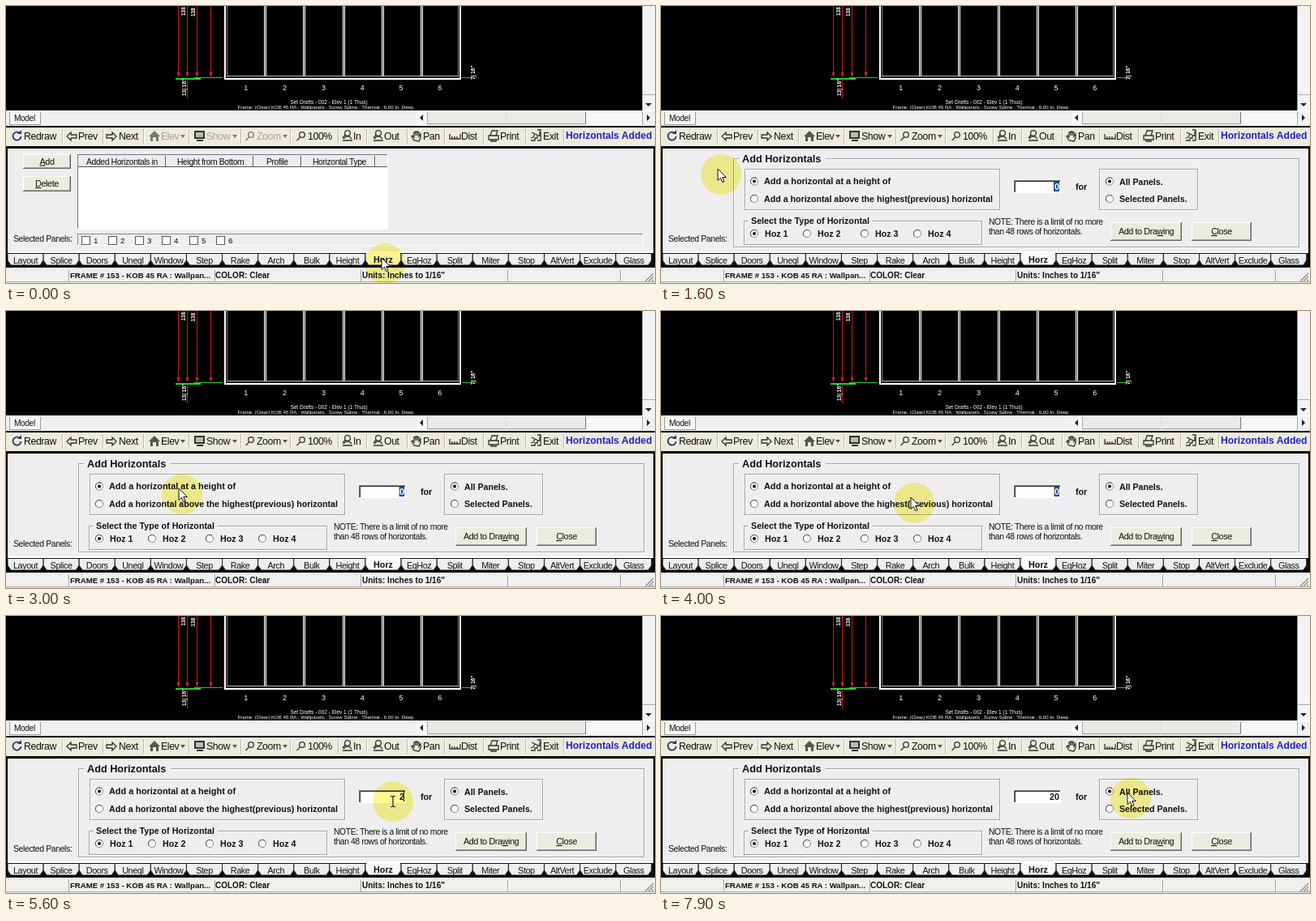
An HTML page that plays this animation: 800 by 342 pixels, repeating every 8 s.

```html
<!DOCTYPE html>
<html lang="en">
<head>
<meta charset="utf-8">
<title>Add Horizontals</title>
<style>
html, body { margin: 0; width: 100%; height: 100%; overflow: hidden; background: #000; }
svg { display: block; width: 800px; height: 342px; font-family: "Liberation Sans", Arial, sans-serif; }
text { white-space: pre; fill: #111; }
rect { shape-rendering: crispEdges; }
.b { font-weight: bold; }
.tight { letter-spacing: -.4px; }
.mid { text-anchor: middle; }
.end { text-anchor: end; }
.u { text-decoration: underline; }
.cad text { fill: #fff; }
.tool { fill: none; stroke: #333; stroke-width: 1.3; }
.off text { fill: #a3a399; }
.off .tool { stroke: #777; }
.off .solid { fill: #777; }
#halo { mix-blend-mode: multiply; }
#caret { mix-blend-mode: difference; }
</style>
</head>
<body>
<svg id="stage" viewBox="0 0 800 342"></svg>
<script>
const FACE = '#efeeee';
const rect = (x, y, w, h, fill, more = '') =>
  `<rect x="${x}" y="${y}" width="${w}" height="${h}" fill="${fill}" ${more}/>`;
const text = (x, y, s, size, cls = '', more = '') =>
  `<text x="${x}" y="${y}" font-size="${size}" class="${cls}" ${more}>${s}</text>`;
const path = (d, stroke, w = 1, fill = 'none', more = '') =>
  `<path d="${d}" stroke="${stroke}" stroke-width="${w}" fill="${fill}" ${more}/>`;
const each = (list, fn) => list.map(fn).join('');
const key = c => `<tspan class="u">${c}</tspan>`;

const button = (x, y, w, h, label) =>
  rect(x, y, w, h, '#666') + rect(x, y, w - 1, h - 1, '#fff') +
  rect(x + 1, y + 1, w - 2, h - 2, '#a5a5a0') + rect(x + 1, y + 1, w - 3, h - 3, '#ecebe0') +
  text(x + w / 2, y + h / 2 + 3.5, label, 10.8, 'mid tight');

const sunken = (x, y, w, h) =>
  rect(x, y, w, h, '#fff') + rect(x, y, w - 1, h - 1, '#777') +
  rect(x + 1, y + 1, w - 2, h - 2, '#333') + rect(x + 2, y + 2, w - 3, h - 3, '#fff');

const group = (x, y, w, h) =>
  rect(x + 1.5, y + 1.5, w, h, 'none', 'stroke="#fff"') +
  rect(x + .5, y + .5, w, h, 'none', 'stroke="#a2a2a2"');

const radio = (x, y, on) =>
  `<circle cx="${x}" cy="${y}" r="4.6" fill="#fff" stroke="#8a8a8a"/>` +
  path(`M${x - 3.3} ${y + 3.3}A4.6 4.6 0 0 1 ${x + 3.3} ${y - 3.3}`, '#555') +
  (on ? `<circle cx="${x}" cy="${y}" r="2" fill="#000"/>` : '');

function drawing() {
  const mullions = each([0, 1, 2, 3, 4], i => {
    const x = 318 + Math.round(i * 48.3);
    return rect(x, 0, 1, 87, '#fff') + rect(x + 1, 0, 1, 87, '#444') + rect(x + 2, 0, 1, 87, '#fff');
  });
  const dims = each([212, 223, 235, 252], x =>
    rect(x, 0, 1, 87, '#d01818') + path(`M${x - 1.5} 82h4l-2 6z`, 'none', 0, '#e02020'));
  const turned = (x, y, s) => text(x, y, s, 6.5, 'b', `transform="rotate(-90 ${x} ${y})"`);
  return `<g class="cad">` + rect(0, 0, 800, 130, '#000') + mullions +
    rect(269, 0, 2, 91, '#fff') + rect(272, 0, 1, 86, '#888') +
    rect(557, 0, 1, 86, '#888') + rect(559, 0, 2, 91, '#fff') +
    rect(272, 86, 286, 1, '#bbb') + rect(269, 89, 292, 2, '#fff') +
    dims + rect(223, 92, 1, 22, '#d01818') + rect(577, 88, 4, 1, '#b02020') +
    rect(209, 89, 31, 2, '#20d030') + rect(232, 88, 35, 1, '#20d030') + rect(562, 88, 16, 1, '#20c030') +
    turned(221, 12, '138') + turned(233, 13, '138 3') + turned(222, 111, '13| 16"') + turned(578, 91, '7| 16"') +
    each([1, 2, 3, 4, 5, 6], n => text(248 + n * 47.8, 104, n, 9, 'mid')) +
    text(398, 121, 'Set Drafts - 002 - Elev 1 (1 Thus)', 6.5, 'mid') +
    text(394, 126.5, 'Frame: (Clear) KOB 45 RA : Wallpanels : Screw Spline : Thermal : 6.00 In. Deep', 6.1, 'mid') +
    `</g>`;
}

function scrollbars() {
  const arrow = d => path(d, 'none', 0, '#222');
  return rect(784, 0, 16, 129, '#f3f3f3') + rect(784, 0, 1, 129, '#999') +
    rect(785, 109, 15, 1, '#aaa') + arrow('M788 120h8l-4 4z') +
    rect(0, 129, 800, 19, '#f0f0f0') + rect(0, 129, 800, 1, '#fff') +
    rect(4, 131, 39, 16, '#999') + rect(5, 130, 37, 16, '#f6f6f4') +
    text(10, 142, 'Model', 10.2, 'tight') +
    rect(506, 131, 278, 15, '#f7f7f7') + rect(519, 131, 1, 15, '#aaa') +
    rect(520, 131, 195, 15, '#eceae6') + rect(520, 145, 195, 1, '#999') + rect(714, 131, 1, 15, '#777') +
    rect(616, 131, 1, 15, '#ddd') + arrow('M514 134v8l-4-4z') + arrow('M790 134v8l4-4z') +
    rect(784, 130, 1, 17, '#aaa');
}

function toolbar() {
  const label = (x, s) => text(x, 165, s, 12.3, 'tight');
  const lens = (x, y) => `<circle class="tool" cx="${x + 1}" cy="${y - 2}" r="3.3"/>` +
    `<path class="tool" d="M${x - 1.5} ${y + 1}l-4 4"/>`;
  const tool = d => `<path class="tool" d="${d}"/>`;
  const person = x => tool(`M${x - 6} 166h12M${x - 5} 164l3-3h4l3 3`) +
    `<circle class="tool" cx="${x}" cy="157" r="3.4"/>` + tool(`M${x - 3} 159l-3 4`);
  const drop = x => `<path class="solid" fill="#555" d="M${x} 159h6l-3 4z"/>`;
  const menus =
    `<g id="menus">` +
    `<path class="solid" fill="#555" d="M176 161l7-7 7 7h-2v6h-3v-5h-4v5h-3v-6z"/>` + label(191, 'Elev') + drop(215) +
    `<path fill="#333" d="M232 154h13v10h-13zM235 165h8v2h-8z"/>` +
    rect(234, 156, 9, 6, '#b9bcb4') + label(247, 'Show') + drop(279) +
    lens(301, 161) + label(309, 'Zoom') + drop(341) + `</g>`;
  const labels = [[22, 'Redraw'], [89, 'Prev'], [139, 'Next'], [372, '100%'], [428, 'In'], [466, 'Out'],
    [514, 'Pan'], [561, 'Dist'], [609, 'Print'], [662, 'Exit']];
  return rect(0, 148, 800, 2, '#000') + rect(0, 150, 800, 24, '#ecebdd') +
    each([69, 119, 169, 225, 289, 350, 409, 444, 494, 540, 588, 640, 687], x =>
      rect(x, 152, 1, 18, '#b9b9a8') + rect(x + 1, 152, 1, 18, '#fff')) +
    each(labels, ([x, s]) => label(x, s)) + menus +
    path('M17 157a5 5 0 1 0 1.500 4', '#26357c', 1.8) + path('M14 158h5v-5z', 'none', 0, '#26357c') +
    tool('M75 161l5-5v3h7v4h-7v3z') + tool('M136 161l-5-5v3h-7v4h7v3z') +
    lens(364, 161) + person(421) + person(459) +
    tool('M503 166l-3-5 1-1 2 2v-6h2v4-5h2v5-4h2v5l2-3v5l-2 4z') +
    tool('M547 158v6h13v-6M550 161v3M553 161v3M556 161v3') +
    tool('M595 160h12v5h-12zM597 160l2-6h7l-2 6M598 165v2h7') +
    tool('M647 166h5v-3h3v-3h3v-5M648 156l4 2-2 4-3 1M652 158l3 1M655 153h4v13h-4') +
    text(690, 164, 'Horizontals Added to', 12.1, 'b', 'style="fill:#2222cc"') +
    rect(0, 173, 800, 3, '#000');
}

function tableView() {
  const heads = [[99, 'Added Horizontals in'], [211, 'Height from Bottom'], [321, 'Profile'], [378, 'Horizontal Type']];
  return `<g id="table">` + button(21, 183, 59, 18, key('A') + 'dd') + button(21, 210, 59, 19, key('D') + 'elete') +
    rect(88, 183, 383, 93, '#fff') + rect(88, 183, 382, 1, '#777') + rect(88, 183, 1, 92, '#777') +
    rect(89, 184, 381, 15, '#ececea') + rect(89, 198, 381, 1, '#555') +
    each([196, 304, 363, 454], x => rect(x, 185, 1, 13, '#555') + rect(x + 1, 185, 1, 13, '#fff')) +
    each(heads, ([x, s]) => text(x, 195.5, s, 10.4, 'tight')) +
    rect(88, 281, 698, 15, '#fff') + rect(88, 281, 697, 14, '#888') + rect(89, 282, 696, 13, FACE) +
    each([1, 2, 3, 4, 5, 6], n => {
      const x = 60 + Math.round(n * 33.1);
      return rect(x + .5, 284.5, 10, 10, '#fff', 'stroke="#555"') + text(x + 15, 293, n, 9.8);
    }) + `</g>`;
}

function dialogView() {
  return `<g id="dialog">` + group(89, 188, 697, 109) + rect(96, 184, 107, 10, FACE) +
    text(100, 192.5, 'Add Horizontals', 12.7, 'b') +
    group(103, 201, 314, 50) + group(540, 201, 121, 50) + group(102, 265, 293, 29) +
    rect(108, 262, 153, 8, FACE) + text(111, 268.5, 'Select the Type of Horizontal', 10.7, 'b') +
    radio(115, 216.5, true) + text(127, 220, 'Add a horizontal at a height of', 10.9, 'b') +
    radio(115, 238, false) + text(127, 241.5, 'Add a horizontal above the highest(previous) horizontal', 10.65, 'b') +
    radio(553, 216.5, true) + text(565, 220.5, 'All Panels.', 10.6, 'b') +
    radio(553, 238, false) + text(565, 242, 'Selected Panels.', 10.6, 'b') +
    each([115, 180, 251, 316], (x, i) => radio(x, 281, !i) + text(x + 13, 285, 'Hoz ' + (i + 1), 10.7, 'b')) +
    sunken(435, 215, 58, 16) + `<rect id="mark" x="484" y="217" width="7" height="12" fill="#27498f"/>` +
    text(491, 227, '', 10.8, 'b end', 'id="value"') + `<rect id="caret" y="217" width="1" height="12" fill="#fff"/>` +
    text(511, 226.5, 'for', 10.7, 'b') +
    text(404, 270, 'NOTE: There is a limit of no more', 10.35, 'tight') +
    text(404, 281.5, 'than 48 rows of horizontals.', 10.35, 'tight') +
    button(554, 267, 88, 23, 'Add to Dra' + key('w') + 'ing') + button(654, 267, 74, 23, key('C') + 'lose') + `</g>`;
}

function tabs() {
  const names = ['Layout', 'Splice', 'Doors', 'Uneql', 'Window', 'Step', 'Rake', 'Arch', 'Bulk', 'Height', 'Horz',
    'EqHoz', 'Split', 'Miter', 'Stop', 'AltVert', 'Exclude', 'Glass'];
  const active = 10;
  const tab = (s, i) => {
    const x = 2 + i * 44.1, on = i === active;
    return path(`M${x} 306v8l4 6h36l4-6v-8`, '#222', 1, on ? '#fafafa' : FACE) +
      (on ? rect(x + 1, 304, 42, 3, '#fafafa') : '') +
      text(x + 22, on ? 316.5 : 317.5, s, 10.8, on ? 'b mid' : 'mid tight');
  };
  return rect(0, 303, 800, 2, '#fff') + rect(0, 305, 800, 16, '#111') +
    each(names, tab) + rect(0, 320, 800, 3, '#000') + rect(0, 176, 2, 146, '#000') + rect(798, 176, 2, 146, '#000');
}

function statusBar() {
  return rect(0, 323, 800, 19, '#f0f0ef') + rect(0, 323, 800, 1, '#fff') +
    each([77, 257, 437, 618, 757], x => rect(x, 326, 1, 14, '#999') + rect(x + 1, 326, 1, 14, '#fff')) +
    rect(0, 340, 800, 1, '#aaa') +
    text(79, 336, 'FRAME # 153 - KOB 45 RA : Wallpan...', 9.6, 'b') +
    text(258, 336, 'COLOR: Clear', 10, 'b') + text(439, 336, 'Units: Inches to 1/16"', 10, 'b') +
    path('M788 340l10-10M792 340l6-6M796 340l2-2', '#888', 1.3);
}

const pointer =
  `<g id="pointer"><circle id="halo" r="25" fill="#fcf894"/>` +
  path('M-4-7v14.500l3.400-3.200 2.300 5.400 2.300-1-2.300-5.200h4.600z', '#111', 1, '#fff', 'id="arrow"') +
  path('M-3-6.500h2l1 1 1-1h2M-3 6.500h2l1-1 1 1h2M0-5.500v11', '#222', 1.2, 'none', 'id="beam"') + `</g>`;

const stage = document.getElementById('stage');
stage.innerHTML = drawing() + scrollbars() + toolbar() + rect(0, 176, 800, 130, FACE) +
  tableView() + dialogView() + text(9, 291, 'Selected Panels:', 10.5, 'tight') + tabs() + statusBar() + pointer;

const el = id => document.getElementById(id);
const show = (id, on) => el(id).setAttribute('visibility', on ? 'inherit' : 'hidden');
// The halo must blend with the whole page, so it sits outside the pointer group.
const halo = stage.insertBefore(el('halo'), el('pointer'));

const LOOP = 8000, STEP = 100, OPEN = 1500, TYPE_1 = 5400, TYPE_2 = 5800;
const route = [
  [0, 467, 318], [300, 467, 318], [500, 428, 307], [1000, 160, 230], [1200, 82, 210], [1800, 70, 207],
  [1900, 70, 207], [2200, 71, 205], [2800, 183, 225], [3000, 217, 226], [3200, 199, 223], [3600, 199, 223],
  [4000, 312, 237], [4200, 372, 246], [4500, 425, 241], [4800, 479, 238], [5100, 479, 238], [5500, 477, 229],
  [6000, 477, 229], [6800, 557, 225], [6900, 567, 223], [7200, 579, 225], [LOOP, 579, 225]
];

function place(t) {
  const i = route.findIndex(p => p[0] > t);
  const [t0, x0, y0] = route[i - 1], [t1, x1, y1] = route[i];
  const k = (t - t0) / (t1 - t0);
  return `translate(${x0 + (x1 - x0) * k} ${y0 + (y1 - y0) * k})`;
}

function draw(now) {
  const t = Math.floor(now % LOOP / STEP) * STEP;
  const open = t >= OPEN, typed = t >= TYPE_1;
  const blink = typed ? Math.floor((t - 400) / 500) % 2 === 0 : Math.floor((t - 3310) / 540) % 2 !== 0;
  const beam = t >= 5300 && t < 6200;
  const at = place(t);
  el('pointer').setAttribute('transform', at);
  halo.setAttribute('transform', at);
  show('table', !open);
  show('dialog', open);
  el('menus').setAttribute('class', open ? '' : 'off');
  show('mark', open && !typed);
  show('caret', open && blink);
  el('caret').setAttribute('x', typed ? 490 : 484);
  el('value').textContent = t >= TYPE_2 ? '20' : typed ? '2' : '0';
  el('value').style.fill = typed ? '#111' : '#fff';
  show('arrow', !beam);
  show('beam', beam);
}

const start = performance.now();
function tick() {
  draw(performance.now() - start);
  requestAnimationFrame(tick);
}
tick();
</script>
</body>
</html>
```
